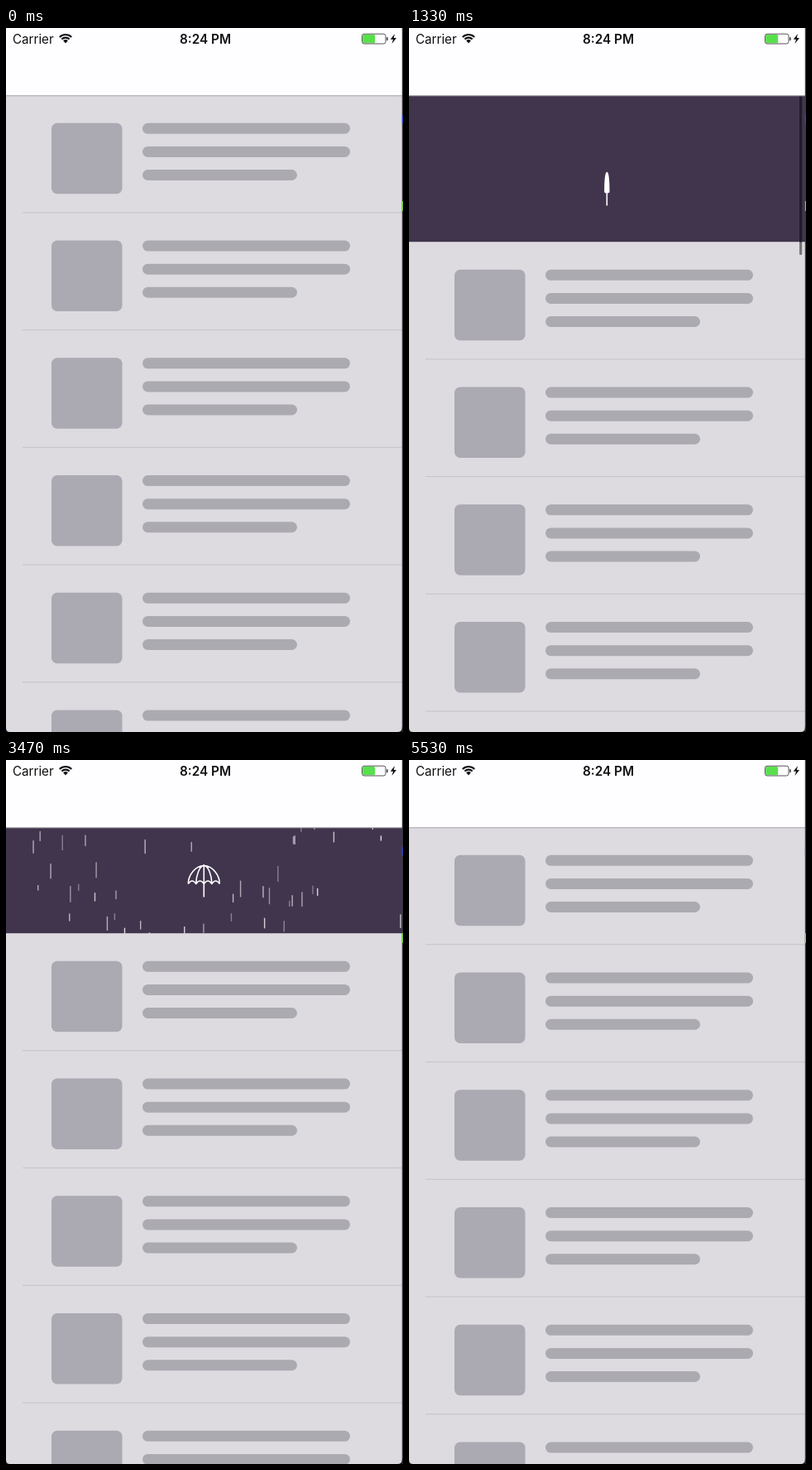
An HTML page with a canvas that plays this animation: 480x850 px, repeating every 5.74 s.

```html
<!DOCTYPE html>
<html lang="en">
<head>
<meta charset="utf-8">
<title>Rainy pull to refresh</title>
<style>
  html, body { margin: 0; width: 100%; height: 100%; overflow: hidden; background: #dddbe0; }
  canvas { display: block; }
</style>
</head>
<body>
<canvas id="stage" width="480" height="850"></canvas>
<script>
const ctx = document.getElementById('stage').getContext('2d');
const LOOP = 5740, STEP = 1000 / 15;
const W = 480, H = 850, TOP = 81.5, REST = 128, PULL = 177, ROW = 141.75;
const RAIN_START = 1900, DROPS = 44;

const lerp = (a, b, k) => a + (b - a) * k;
const phase = (t, from, to) => Math.min(1, Math.max(0, (t - from) / (to - from)));
const easeInOut = k => k * k * (3 - 2 * k);
const easeOut = k => 1 - (1 - k) ** 3;
const rand = n => { const v = Math.sin(n * 127.1 + 311.7) * 43758.5453; return v - Math.floor(v); };

function rect(x, y, w, h, color) {
  ctx.fillStyle = color;
  ctx.fillRect(x, y, w, h);
}

function pill(x, y, w, h, r, color) {
  ctx.fillStyle = color;
  ctx.beginPath();
  ctx.roundRect(x, y, w, h, r);
  ctx.fill();
}

// Height of the revealed header
function headerHeight(t) {
  if (t < 1340) return PULL * Math.sin(phase(t, 683, 1200) * Math.PI / 2);
  if (t < 4500) return lerp(PULL, REST, easeOut(phase(t, 1340, 1800)));
  return REST * (1 - easeInOut(phase(t, 4520, 4930)));
}

const umbrellaOpening = t =>
  easeInOut(phase(t, 1640, 2140)) * (1 - easeInOut(phase(t, 4300, 4640)));

function drawRain(t, bottom) {
  if (t < RAIN_START) return;
  const span = REST + 30;
  for (let i = 0; i < DROPS; i++) {
    const speed = lerp(0.24, 0.42, rand(i));
    const travel = speed * (t - RAIN_START) - span * rand(i + 50);
    if (travel < 0) continue;
    const seed = i * 31 + Math.floor(travel / span) * 7;
    const length = lerp(6, 20, rand(seed + 3));
    const x = lerp(28, 478, rand(seed));
    const y = bottom - REST - 20 + travel % span;
    ctx.globalAlpha = lerp(0.35, 0.85, rand(seed + 5));
    rect(x, y, 1.4, length, '#fff');
  }
  ctx.globalAlpha = 1;
}

function drawUmbrella(bottom, open) {
  const half = lerp(2.4, 19, open), height = lerp(24, 22, open), rim = -16;
  ctx.save();
  ctx.translate(239.3, bottom - 44);
  ctx.strokeStyle = ctx.fillStyle = '#fff';
  ctx.lineWidth = 1.6;
  ctx.lineJoin = 'round';
  ctx.beginPath();
  ctx.moveTo(0, -39.5);
  ctx.lineTo(0, 0);
  const ribs = [-1, -0.5, 0, 0.5, 1].map(k => k * half);
  for (const x of ribs) {
    ctx.moveTo(0, rim - height);
    ctx.bezierCurveTo(x * 0.56, rim - height, x, rim - height * 0.45, x, rim);
  }
  ctx.moveTo(ribs[0], rim);
  for (let i = 1; i < ribs.length; i++) {
    ctx.quadraticCurveTo((ribs[i - 1] + ribs[i]) / 2, rim - 7 * open, ribs[i], rim);
  }
  ctx.stroke();
  ctx.restore();
}

function drawList(top) {
  rect(0, top, W, H - top, '#dddbe0');
  for (let y = top; y < H; y += ROW) {
    pill(55, y + 33.3, 85.5, 85.5, 7, '#aba9b2');
    [251, 251, 187].forEach((w, i) => pill(165, y + 33.3 + i * 28.1, w, 13, 6.5, '#acaab1'));
    rect(20, y + 140.7, 459, 1.2, '#c8c6cb');
  }
}

function drawScrollbar(t, h) {
  if (t < 690 || t > 2340) return;
  const settle = easeOut(phase(t, 1340, 1800));
  const top = lerp(86 - 4 * phase(h, 25, PULL), 86, settle);
  const bottom = t < 1340 ? lerp(475, 274, phase(h, 25, PULL)) : lerp(274, 465, settle);
  ctx.globalAlpha = 1 - phase(t, 2060, 2340);
  pill(472, top, 3.2, bottom - top, 1.6, 'rgba(0,0,0,.47)');
  ctx.globalAlpha = 1;
}

function drawStatusBar() {
  rect(0, 0, W, TOP, '#fefdff');
  ctx.fillStyle = '#111';
  ctx.textAlign = 'left';
  ctx.font = '15.2px Inter, sans-serif';
  ctx.fillText('Carrier', 8, 18.5);
  ctx.textAlign = 'center';
  ctx.font = '600 15.3px Inter, sans-serif';
  ctx.fillText('8:24 PM', 241, 18.5);

  ctx.strokeStyle = '#111';
  ctx.lineWidth = 2.1;
  for (const r of [6.6, 10.2]) {
    ctx.beginPath();
    ctx.arc(72, 18.2, r, -Math.PI * 0.75, -Math.PI * 0.25);
    ctx.stroke();
  }
  ctx.beginPath();
  ctx.moveTo(72, 18.6);
  ctx.arc(72, 18.2, 4, -Math.PI * 0.75, -Math.PI * 0.25);
  ctx.fill();

  pill(431.2, 8, 15, 10.3, 1.5, '#58e04c');
  ctx.strokeStyle = '#555';
  ctx.lineWidth = 1;
  ctx.beginPath();
  ctx.roundRect(430.5, 7.2, 28.5, 11.8, 2.5);
  ctx.stroke();
  pill(460, 11, 1.8, 4.2, 1, '#555');
  ctx.fillStyle = '#111';
  ctx.fill(new Path2D('M470 7L464.8 13.8H468L466.6 19L472 12H468.8Z'));
}

function drawEdges() {
  rect(478.8, 0, 1.2, H, '#3c3a40');
  rect(478.8, 105, 1.2, 10, '#3346c8');
  rect(478.8, 209, 1.2, 12, '#6cd52c');
  ctx.fillStyle = '#222';
  ctx.fill(new Path2D('M0 845Q0 850 5 850H0ZM479 844Q479 850 473 850H480V844Z'));
}

function draw(t) {
  const h = headerHeight(t), bottom = TOP + h;
  if (h > 0) {
    ctx.save();
    ctx.beginPath();
    ctx.rect(0, TOP, W, h);
    ctx.clip();
    rect(0, TOP, W, h, '#41354e');
    drawRain(t, bottom);
    drawUmbrella(bottom, umbrellaOpening(t));
    ctx.restore();
  }
  drawList(bottom);
  drawScrollbar(t, h);
  drawStatusBar();
  rect(0, 81.3, W, 1, '#a9a7ac');
  drawEdges();
}

function tick() {
  const t = performance.now() % LOOP;
  draw(Math.floor((t + 5) / STEP) * STEP);
  requestAnimationFrame(tick);
}
tick();
</script>
</body>
</html>
```
